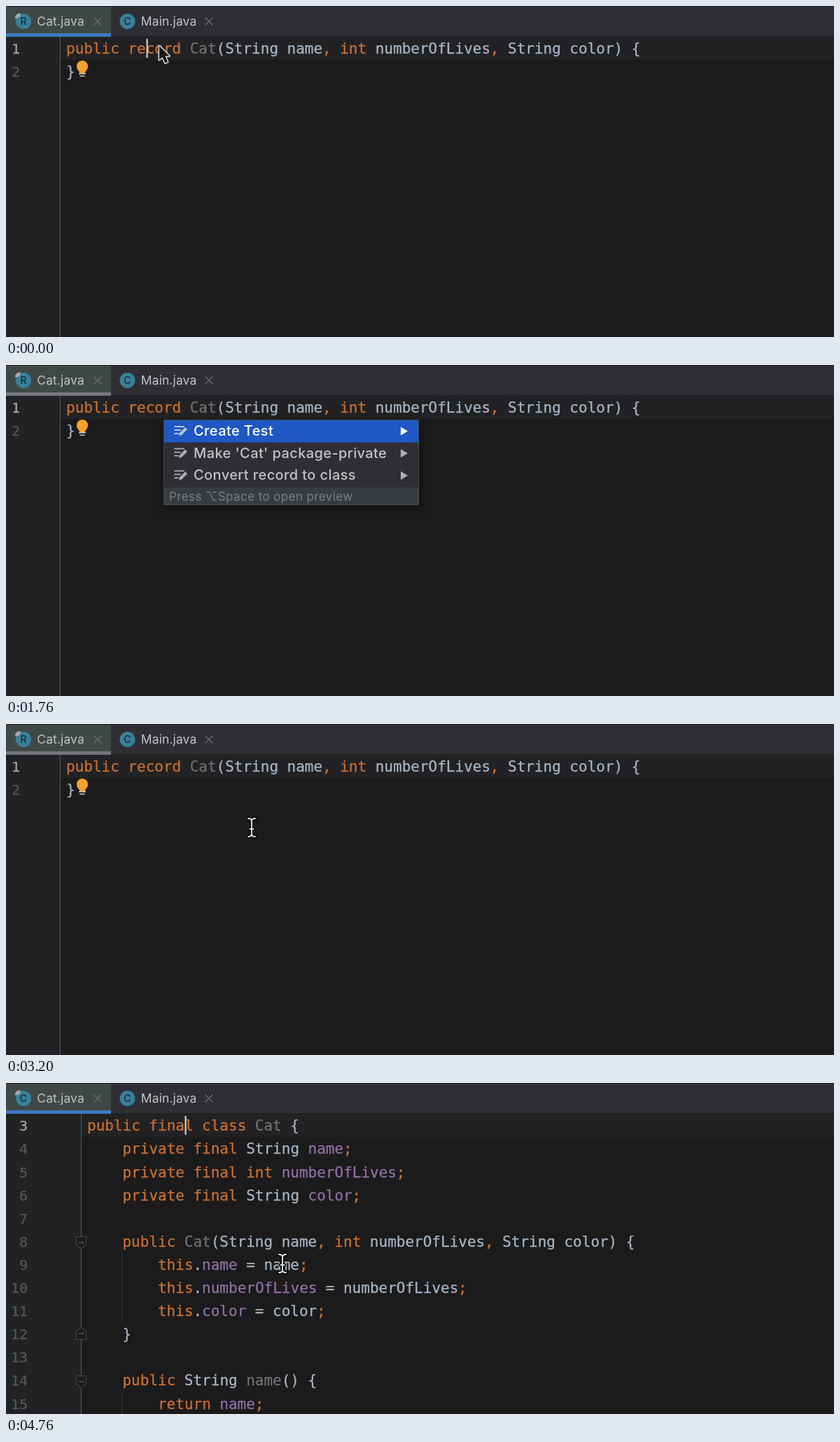
An HTML page with a canvas for the animation above (4800 ms loop, 1183 px wide and 473 px high).

```html
<!DOCTYPE html>
<html lang="en">
<head>
<meta charset="utf-8">
<title>Convert record to class</title>
<style>
html, body { margin: 0; width: 100%; height: 100%; overflow: hidden; background: #1b1b1c; }
canvas { display: block; }
</style>
</head>
<body>
<canvas id="stage" width="1183" height="473"></canvas>
<script>
const ctx = document.getElementById('stage').getContext('2d');
const LOOP = 4800, ROW = 33.1, COL = 12.62;
const MONO = '"DejaVu Sans Mono", monospace';
const UI = 'Inter, "Open Sans", sans-serif';
const COLOR = { keyword: '#cc7130', plain: '#a9b7c6', unused: '#707173', field: '#9270a6', method: '#ffc66d' };
const KEYWORD = /^(public|private|final|record|class|int|this|return|[;,])$/;

// Prefixes: @ type declaration, ^ constructor or method, ~ field
const RECORD = ['public record @Cat(String name, int numberOfLives, String color) {', '}'];
const CLASS = [
  'public final class @Cat {',
  '    private final String ~name;',
  '    private final int ~numberOfLives;',
  '    private final String ~color;',
  '',
  '    public ^Cat(String name, int numberOfLives, String color) {',
  '        this.~name = name;',
  '        this.~numberOfLives = numberOfLives;',
  '        this.~color = color;',
  '    }',
  '',
  '    public String ^name() {',
  '        return ~name;'
];
const ACTIONS = ['Create Test', "Make 'Cat' package-private", 'Convert record to class'];

const box = (x, y, w, h, color) => { ctx.fillStyle = color; ctx.fillRect(x, y, w, h); };

function text(str, x, y, font, color, spacing = 0, align = 'left') {
  ctx.font = font;
  ctx.fillStyle = color;
  ctx.letterSpacing = spacing + 'px';
  ctx.textAlign = align;
  ctx.fillText(str, x, y);
}

// Monospaced text with a hairline outline for a medium weight
function mono(str, x, y, size, color, align) {
  text(str, x, y, size + 'px ' + MONO, color, 0, align);
  ctx.strokeStyle = color;
  ctx.lineWidth = 0.25;
  ctx.strokeText(str, x, y);
}

function shape(d, x, y, fill, stroke, width = 1) {
  const path = new Path2D(d);
  ctx.save();
  ctx.translate(x, y);
  ctx.lineJoin = ctx.lineCap = 'round';
  if (stroke) { ctx.strokeStyle = stroke; ctx.lineWidth = width; ctx.stroke(path); }
  if (fill) { ctx.fillStyle = fill; ctx.fill(path); }
  ctx.restore();
}

function disc(x, y, r, color) {
  ctx.beginPath();
  ctx.arc(x, y, r, 0, 7);
  ctx.fillStyle = color;
  ctx.fill();
}

function tab(x, name, letter, pinned) {
  disc(x, 22, 11, '#38809b');
  text(letter, x, 27, '500 14px ' + UI, '#182a33', 0, 'center');
  if (pinned) shape('M-3 3Q-4-2 3-3Q4 2-3 3Z', x - 8, 14, '#a5a9ab', '#a5a9ab', 1.5);
  text(name, x + 19.3, 28, '17.5px ' + UI, '#c2c4c7', 0.1);
}

function tabs(letter, underline) {
  box(0, 0, 1183, 43, '#2f2e33');
  box(0, 0, 150, 40, '#3f4846');
  box(0, 0, 1183, 1, '#1e1e20');
  box(0, 39, 150, 5, underline);
  tab(25, 'Cat.java', letter, true);
  tab(173.5, 'Main.java', 'C', false);
  for (const x of [131, 290]) shape('M-5-5L5 5M5-5L-5 5', x, 22, null, '#6b6d70', 1.3);
}

function tokenColor(mark, word, colored, unused) {
  if (mark === '@') return unused ? COLOR.unused : COLOR.plain;
  if (mark === '^') return unused ? COLOR.unused : colored ? COLOR.method : COLOR.plain;
  if (mark === '~') return colored ? COLOR.field : COLOR.plain;
  return KEYWORD.test(word) ? COLOR.keyword : COLOR.plain;
}

function codeLine(line, x, y, colored, unused) {
  for (const [, mark, word] of line.matchAll(/([@^~]?)(\w+|[^\w@^~])/g)) {
    if (word !== ' ') mono(word, x, y, 21, tokenColor(mark, word, colored, unused));
    x += word.length * COL;
  }
}

function editor(lines, first, gutter, numberRight, colored, unused) {
  box(0, 43, 1183, 430, '#1b1b1c');
  box(0, 43, gutter, 430, '#222224');
  box(0, 43, 1183, 34, '#222224');
  box(gutter - 0.5, 43, 1, 430, '#58595b');
  lines.forEach((line, i) => {
    const y = 68.3 + i * ROW;
    mono(first + i, numberRight, y, 20, i ? '#55575a' : '#a6a6a8', 'right');
    codeLine(line, gutter + 8.5, y, colored, unused);
  });
}

function folding(gutter) {
  const guide = Math.round(gutter + 57.5);
  box(guide, 242, 1, 100, '#343437');
  box(guide, 441, 1, 32, '#343437');
  const down = 'M-6.5-8H6.5V3L0 8.5L-6.5 3Z', up = 'M-6.5 8H6.5V-3L0-8.5L-6.5-3Z';
  for (const [y, d] of [[228, down], [358, up], [427, down]]) {
    shape(d, gutter, y, '#1b1b1c', '#55575a', 1.4);
    shape('M-3.5 0H3.5', gutter, y, null, '#66686b', 1.2);
  }
}

function caret(gutter, col) {
  box(Math.round(gutter + 8.5 + col * COL) + 0.5, 47, 2.2, 27, '#d0d2d4');
}

function bulb() {
  shape('M-4 8C-4 4-8 4-8-2A8 8 0 0 1 8-2C8 4 4 4 4 8Z', 109, 88, '#f2a32a');
  box(104, 96, 10, 1.5, '#c9cbcd');
  box(105.5, 99.5, 7, 1.5, '#c9cbcd');
}

function popup(selected) {
  ctx.save();
  ctx.shadowColor = 'rgba(0,0,0,.45)';
  ctx.shadowBlur = 14;
  ctx.shadowOffsetY = 4;
  box(226, 78, 364, 122, '#2f2e33');
  ctx.restore();
  ACTIONS.forEach((label, i) => {
    const y = 94 + i * 31.7, active = i === selected;
    if (active) box(226, y - 15.5, 364, 32, '#1f57c3');
    const ink = active ? '#b9c4d8' : '#aeb1b4';
    shape('M-9-6H4M-9-1H-1M-9 4H-4', 250, y, null, ink, 1.8);
    shape('M-3 7L-2 3L6-5L9-2L1 6Z', 250, y, ink);
    text(label, 268, y + 7, '500 20px ' + UI, active ? '#fff' : '#c2c4c7', 0.4);
    shape('M-5-6L5 0L-5 6Z', 569, y + 0.5, active ? '#fff' : '#aeb1b4');
  });
  box(226, 175, 364, 25, '#393c3e');
  text('Press ⌥Space to open preview', 233, 194, '17px ' + UI, '#7d8082', 0.4);
  ctx.strokeStyle = '#4a4b4e';
  ctx.lineWidth = 1;
  ctx.strokeRect(225.5, 78.5, 364, 121);
}

const arrow = (x, y) =>
  shape('M0 0V20L4.6 16L8.3 24.5L12 22.8L8.4 14.6H14.5Z', x, y, '#171718', '#dcdcdc', 3);

function beam(x, y) {
  const d = 'M-5-13Q0-13 0-9Q0-13 5-13M0-9V9M-5 13Q0 13 0 9Q0 13 5 13M-2.5 2H2.5';
  shape(d, x, y, null, '#0c0c0d', 5.5);
  shape(d, x, y, null, '#d8d8d8', 2);
}

function hand(x, y) {
  shape('M-3 0Q-1-3 2 0L5 8Q7 6 9 8Q11 7 12 9Q15 8 15 12V16Q14 19 13 23H2Q0 18-4 14Q-5 11-2 11L1 13Z', x, y, '#f2f2f2', '#161617', 2.2);
  for (const dx of [4, 7, 10]) shape('M0 14V19', x + dx, y, null, '#3a3a3c', 1);
}

const ease = u => u * u * (3 - 2 * u);

// Stops are [time, x, y]
function along(stops, t) {
  const i = stops.findIndex(s => s[0] > t);
  if (i < 0) return stops.at(-1).slice(1);
  if (!i) return stops[0].slice(1);
  const [a, b] = [stops[i - 1], stops[i]];
  const u = (t - a[0]) / (b[0] - a[0]);
  return [1, 2].map(k => a[k] + (b[k] - a[k]) * u);
}
const TO_MENU = [[2260, 220, 62], [2340, 236, 69], [2450, 294, 90], [2560, 333, 111], [2660, 342, 129],
  [2760, 346, 142], [2800, 351, 146], [2960, 352, 148]];

function draw(t) {
  const converted = t >= 3500;
  const gutter = !converted ? 77.5 : t < 4000 ? 88.5 : 107.5;
  if (converted) {
    editor(CLASS, 3, gutter, 31, t >= 3700, t >= 4130);
    folding(gutter);
    caret(gutter, 11);
  } else {
    editor(RECORD, 1, gutter, 20, true, true);
    if (t < 300) caret(gutter, 9);
    else if (t < 830 || (t >= 1330 && t < 1660)) caret(gutter, 11);
    if (t < 300 || t >= 1230) bulb();
  }
  tabs(t < 3700 ? 'R' : 'C', t >= 1700 && !converted ? '#73777b' : '#3b7bc0');

  const [mx, my] = along(TO_MENU, t);
  if (t >= 1700 && t < 3160) popup(my < 113 ? 0 : my < 141 ? 1 : 2);

  if (t < 60) arrow(219, 57);
  else if (t < 1660) beam(220.5, 62);
  else if (t >= 2260 && t < 3200) (mx > 226 && my > 78 ? hand : beam)(mx, my);
  else if (t >= 3200) {
    const u = ease(Math.min(1, Math.max(0, (t - 4330) / 430)));
    beam(351 + 44 * u, 148 + 110 * u);
  }
}

function frame() {
  draw(performance.now() % LOOP);
  requestAnimationFrame(frame);
}
frame();
</script>
</body>
</html>
```
